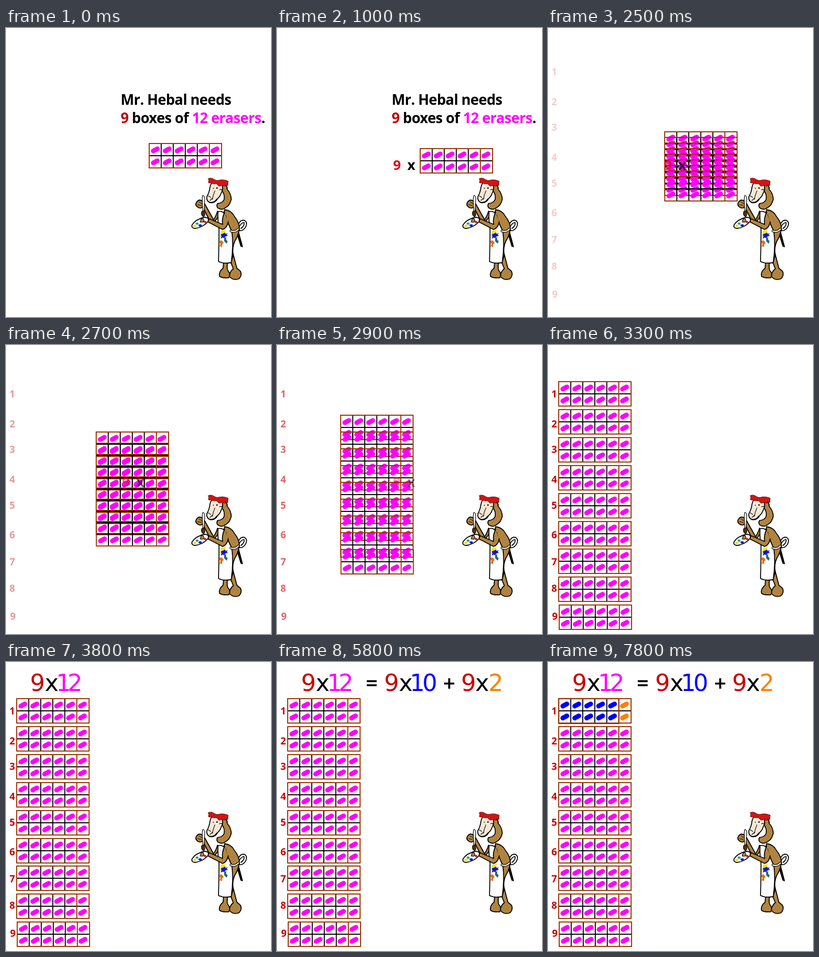
An HTML page that plays this animation: 520 by 568 pixels, repeating every 8 s.

```html
<!DOCTYPE html>
<html lang="en">
<head>
<meta charset="utf-8">
<title>9 boxes of 12</title>
<style>
html, body { margin: 0; width: 100%; height: 100%; overflow: hidden; background: #fff; }
svg { display: block; width: 520px; height: 568px; }
text { white-space: pre; }
.bold { font: bold 28px "Open Sans", "Noto Sans", sans-serif; letter-spacing: -.6px; }
.tag { font: bold 19px "Open Sans", "Noto Sans", sans-serif; text-anchor: middle; }
.times { font: bold 27px "Open Sans", "Noto Sans", sans-serif; text-anchor: middle; }
.sum { font: 46px "DejaVu Sans", sans-serif; text-anchor: middle; }
.sign { font: 40px "Noto Sans", sans-serif; text-anchor: middle; stroke: #000; stroke-width: 1; }
.ink { stroke: #000; stroke-width: 1.8; stroke-linejoin: round; stroke-linecap: round; }
.fur { fill: #b08440; }
</style>
</head>
<body>
<svg viewBox="0 0 520 568" xmlns="http://www.w3.org/2000/svg">
  <g id="title" class="bold">
    <text x="225" y="151">Mr. Hebal needs</text>
    <text x="225" y="187"><tspan fill="#c00000">9</tspan> boxes of <tspan fill="#f0f">12 erasers</tspan>.</text>
  </g>
  <g id="boxes"></g>
  <g id="tags"></g>
  <g id="times" class="times">
    <text x="235.5" y="279" fill="#d8121f">9</text>
    <text x="263.5" y="279">x</text>
  </g>
  <g id="left"></g>
  <g id="right"></g>

  <g id="painter" class="ink" fill="none">
    <!-- apron strings -->
    <path d="M456 400L464 430L461 429L454 406Z" fill="#000"/>
    <path d="M454 398Q453 386 461 379Q470 375 472 384Q472 393 463 398Q456 400 457 392Q460 384 467 382Q469 388 461 394" fill="#fff"/>
    <!-- legs and feet -->
    <path class="fur" d="M427 459L426 472Q417 479 419 488Q424 492 437 491Q442 485 435 476Q433 470 435 460Z"/>
    <path class="fur" d="M440 458L446 473Q437 481 439 489Q446 497 457 493Q464 486 460 478L453 472L446 445Z"/>
    <!-- torso -->
    <path class="fur" d="M429 357Q443 359 448 370Q458 382 458 395Q455 410 449 419Q443 432 446 446L441 462L430 454L424 376Z"/>
    <!-- far arm -->
    <path class="fur" d="M415 360Q412 371 405 380L408 383Q415 374 420 364Z"/>
    <!-- apron -->
    <path d="M416 361Q425 358 431 368Q434 382 443 399Q447 425 442 461Q428 464 417 459Q418 420 418 395Q415 377 416 361Z" fill="#fff"/>
    <path d="M441 399Q450 402 456 395" stroke-width="4.500"/>
    <path d="M441 399Q450 402 456 395" stroke="#fff" stroke-width="2.200"/>
    <!-- head -->
    <path class="fur" d="M424 307Q435 308 434 317Q442 326 442 337Q439 349 431 353Q424 359 416 354Q412 350 415 345Q425 344 428 337Q430 327 423 319Z"/>
    <path d="M404 304Q415 301 424 308Q427 317 422 325Q420 332 413 337Q408 345 400 343Q393 340 394 332Q399 323 400 314Q401 308 404 304Z" fill="#f4e8d6"/>
    <path d="M419 318Q425 315 424 322M410 320Q406 329 405 337M397 330L402 333M400 339L406 334" stroke-width="1.100"/>
    <path d="M400 343Q409 344 414 337" stroke-width="2.400"/>
    <circle cx="407" cy="315" r=".9" fill="#000" stroke="none"/>
    <circle cx="414" cy="314.500" r="1.500" fill="#000" stroke="none"/>
    <path d="M397 296Q403 293 409 298Q414 301 419 299Q426 297 436 301L435 310L431 308L430 311Q424 308 418 311L413 306Q407 307 403 305L397 304L398 300Z" fill="#d21414" stroke="#6c1008" stroke-width="1"/>
    <!-- near arm with brush -->
    <path class="fur" d="M389 344L408 378Q410 383 404 382L400 379L385 350Z"/>
    <path class="fur" d="M387 341Q379 335 374 342Q370 348 376 352Q383 357 388 349Z"/>
    <path d="M379 342L384 345M376 347L383 349" stroke-width="1"/>
    <path d="M386 329Q390 329 390 336L388.500 361L386 361L385 336Z" fill="#fff" stroke-width="1.200"/>
    <path d="M384 361Q388 357 390 364Q391 369 387 371Q382 367 384 361Z" fill="#5a2d12" stroke-width="1.100"/>
    <!-- palette -->
    <path class="fur" d="M429 362Q423 375 425 386L399 375L394 380L425 396Q434 393 436 381"/>
    <path d="M365 387Q372 376 389 372Q400 372 396 381Q386 392 371 394Q363 393 365 387Z" fill="#fff"/>
    <path class="fur" d="M382 378Q383 373 387 375L389 380Q385 383 381 381Z" stroke-width="1.100"/>
    <g stroke="none">
      <ellipse cx="370.500" cy="389" rx="3" ry="2.200" fill="#e8e000"/>
      <ellipse cx="375" cy="384.500" rx="2.800" ry="2.200" fill="#2f9c78"/>
      <ellipse cx="381" cy="388" rx="3.300" ry="2.200" fill="#0018e0"/>
      <ellipse cx="391" cy="381.500" rx="2.600" ry="2.200" fill="#d81818"/>
    </g>
    <!-- paint on the apron -->
    <g stroke="none">
      <path d="M422 399L425 397L427 399L431 395L430 404L424 409L420 411Z" fill="#f0e800"/>
      <path d="M421 406L426 404L430 402L431 405L435 403L433 407L436 408L430 410L429 413L425 412L421 414L423 409Z" fill="#1010e0"/>
      <path d="M428 413L432 411L432 416L435 419L433 424L428 419Z" fill="#20706c"/>
      <path d="M421 417L425 419L427 423L424 425L424 431L421 429L419 430L421 424L418 421Z" fill="#e86a10"/>
    </g>
  </g>
</svg>
<script>
const NS = "http://www.w3.org/2000/svg";
const $ = id => document.getElementById(id);
const RED = "#c80000", PINK = "#ff00ff", BLUE = "#0000ff", ORANGE = "#ff8000", BROWN = "#993300";
const LOOP = 8000, ROWS = 9, CELL = 23.6;

function add(parent, tag, attrs, text) {
  const el = document.createElementNS(NS, tag);
  for (const k in attrs) el.setAttribute(k, attrs[k]);
  if (text) el.textContent = text;
  return parent.appendChild(el);
}

// One box: a 6 by 2 grid with an eraser in each cell.
function makeBox() {
  const g = add($("boxes"), "g", { fill: "none", "stroke-width": 2 });
  let grid = "M0 24H142";
  for (let c = 1; c < 5; c++) grid += `M${c * CELL} 0V48`;
  add(g, "path", { d: grid, stroke: "#000" });
  const erasers = [];
  for (let i = 0; i < 12; i++) {
    const x = 12 + (i % 6) * 23.4, y = 12.5 + Math.floor(i / 6) * 23.5;
    erasers.push(add(g, "path", {
      d: `M${x - 4} ${y + 2.1}l8 -4.2`,
      "stroke-width": 9.3, "stroke-linecap": "round"
    }));
  }
  add(g, "path", { d: "M0 0H142V48H0ZM118 0V48", stroke: BROWN });
  const frame = add(g, "path", { d: "M0 0H118V48.7H0Z", stroke: BROWN, "stroke-width": 2.5 });
  return { g, erasers, frame };
}

const boxes = Array.from({ length: ROWS }, makeBox);

[96, 155, 205, 264, 315, 373, 426, 478, 533].forEach((y, i) =>
  add($("tags"), "text", { class: "tag", x: i < 8 ? 12.3 : 13.5, y: y + 7, fill: RED }, String(i + 1)));

function write(parent, glyphs) {
  for (const [ch, x, fill] of glyphs) {
    const sign = "=+".includes(ch);
    add(parent, "text", { class: sign ? "sign" : "sum", x, fill, y: sign ? 55.5 : 56.5 }, ch);
  }
}
write($("left"), [["9", 62, RED], ["x", 89.5, "#000"], ["1", 113, PINK], ["2", 135.5, PINK]]);
write($("right"), [
  ["=", 186, "#000"], ["9", 225, RED], ["x", 252.5, "#000"], ["1", 275.5, BLUE], ["0", 300, BLUE],
  ["+", 338, "#000"], ["9", 376, RED], ["x", 402.5, "#000"], ["2", 429.5, ORANGE]
]);

const show = (el, on) => el.setAttribute("visibility", on ? "visible" : "hidden");

function render(t) {
  const step = t < 2500 ? 0 : Math.min(5, Math.floor((t - 2500) / 200) + 1);
  const u = step / 5;
  show($("title"), step === 0);
  $("times").setAttribute("opacity", t < 1000 ? 0 : 1 - u);
  $("tags").setAttribute("opacity", u);
  $("tags").setAttribute("transform", `translate(0 ${step === 1 ? -10 : 0})`);
  show($("left"), t >= 3800);
  show($("right"), t >= 5800);

  const y0 = t < 1000 ? 227 : 237;
  boxes.forEach(({ g, erasers, frame }, i) => {
    const x = 281 + ((i < 8 ? 21 : 22) - 281) * u;
    const y = y0 + (72 + 54.9 * i - y0) * u;
    g.setAttribute("transform", `translate(${x} ${Math.round(y)})`);
    show(g, i === 0 || step > 0);
    const split = i === 0 && t >= 7800;
    frame.setAttribute("display", split ? "inline" : "none");
    erasers.forEach((e, n) => e.setAttribute("stroke", !split ? PINK : n % 6 < 5 ? BLUE : ORANGE));
  });
}

const start = performance.now();
function tick() {
  render((performance.now() - start) % LOOP);
  requestAnimationFrame(tick);
}
tick();
</script>
</body>
</html>
```
